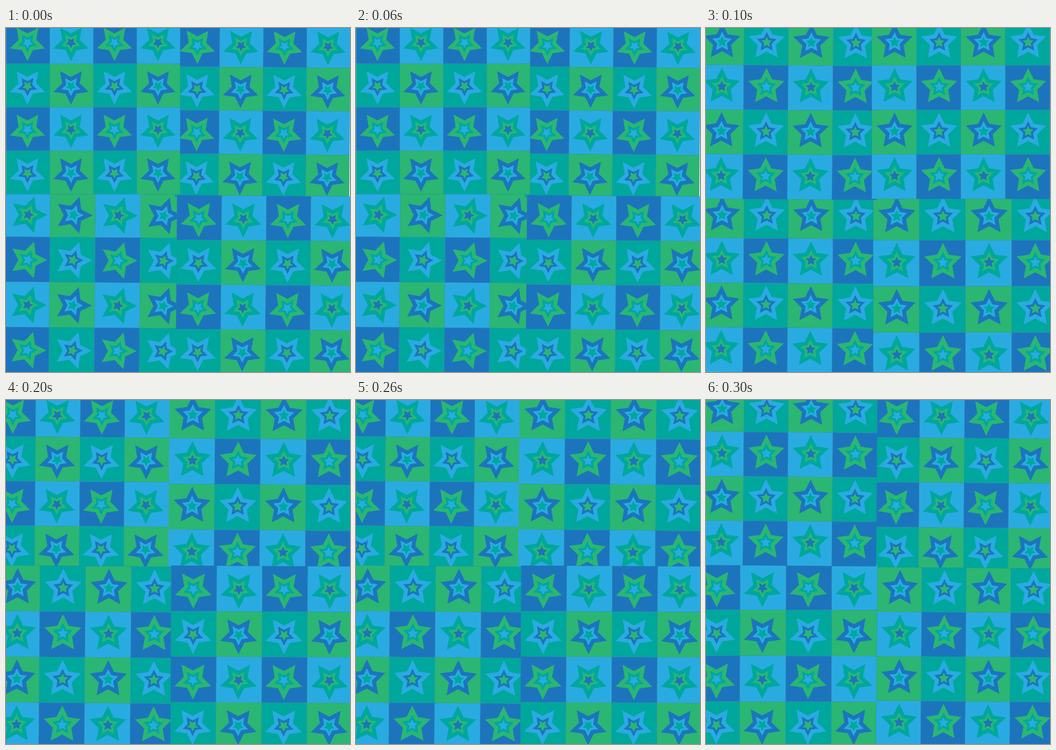
Animation of 748x748 px, one loop 400 ms. Source, as an HTML page with a canvas:

```html
<!DOCTYPE html>
<html lang="en">
<head>
<meta charset="utf-8">
<title>Star quilt</title>
<style>
  html, body { margin: 0; width: 100%; height: 100%; overflow: hidden; background: #fff; }
  canvas { display: block; width: 748px; height: 748px; }
</style>
</head>
<body>
<canvas id="stage" width="748" height="748"></canvas>
<script>
const ctx = document.getElementById('stage').getContext('2d');
const SIZE = 748, STEP = 100;
const navy = '#1c75bc', sky = '#29abe2', green = '#2bb673', teal = '#00a79d';

// Upright 2 x 2 repeat; each tile lists its background, then its stars from large to small.
const REPEAT = [
  [[green, navy, sky, teal], [teal, sky, navy, green]],
  [[sky, teal, green, navy], [navy, green, teal, sky]]
];

function star(x, y, radius, color) {
  ctx.beginPath();
  for (let i = 0; i < 10; i++) {
    const r = i % 2 ? radius / 2 : radius;
    const a = i * Math.PI / 5;
    ctx.lineTo(x + r * Math.sin(a), y - r * Math.cos(a));
  }
  ctx.fillStyle = color;
  ctx.fill();
}

function tile(col, row) {
  const [back, ...stars] = REPEAT[row % 2][col % 2];
  ctx.fillStyle = back;
  ctx.fillRect(col, row, 1, 1);
  ctx.strokeRect(col, row, 1, 1);
  stars.forEach((color, i) => star(col + 0.511, row + 0.483, 0.425 / 1.85 ** i, color));
}

// A 4 x 4 cloth, slightly tilted and turned about its centre by quarter turns.
function cloth(left, top, size, turns, tilt) {
  ctx.save();
  ctx.translate(left + 2 * size, top + 2 * size);
  ctx.rotate(tilt * Math.PI / 180 + turns * Math.PI / 2);
  ctx.scale(size, size);
  ctx.translate(-2, -2);
  ctx.lineWidth = 0.8 / size;
  ctx.strokeStyle = 'rgba(50, 130, 165, 0.6)';
  for (let row = 0; row < 4; row++)
    for (let col = 0; col < 4; col++) tile(col, row);
  ctx.restore();
}

// Cloths hang from the edge of their half; drop lowers one.
const hang = edge => (left, size, { turns = 0, drop = 0, tilt = 0.45 } = {}) =>
  cloth(left, edge + drop, size, turns, tilt);
const upper = hang(-15.5), lower = hang(361);

// Later cloths overlap earlier ones.
const SCENES = [
  () => {
    lower(-3.5, 98.2, { turns: 1, drop: -4 });
    upper(368.8, 94.7, { turns: 2, drop: 6 });
    lower(370.5, 97, { turns: 2, drop: 4 });
    upper(0.4, 94.6, { turns: 2, drop: -1.5, tilt: 0 });
  },
  () => {
    lower(-15.7, 97);
    lower(363.5, 100.4, { tilt: 0 });
    upper(-15.7, 97);
    upper(360.6, 96.8, { tilt: 0 });
  },
  () => {
    upper(-33.6, 96.9, { turns: 2, drop: -1 });
    upper(354.3, 99.2, { drop: 1 });
    lower(-26.8, 99.3);
    lower(358.3, 98.9, { turns: 2, tilt: 0.3 });
  },
  () => {
    upper(366.2, 97.3, { turns: 2, drop: 1 });
    lower(-25.9, 99.6, { turns: 2, drop: -4, tilt: 0.15 });
    lower(371.2, 96.8, { drop: 4 });
    upper(-15.3, 96.7, { drop: -11 });
  }
];

let shown = -1;
function show(index) {
  if (index === shown) return;
  shown = index;
  ctx.fillStyle = '#fff';
  ctx.fillRect(0, 0, SIZE, SIZE);
  SCENES[index]();
}

const start = performance.now();
function tick() {
  show(Math.floor((performance.now() - start) / STEP) % SCENES.length);
  requestAnimationFrame(tick);
}
tick();
</script>
</body>
</html>
```
